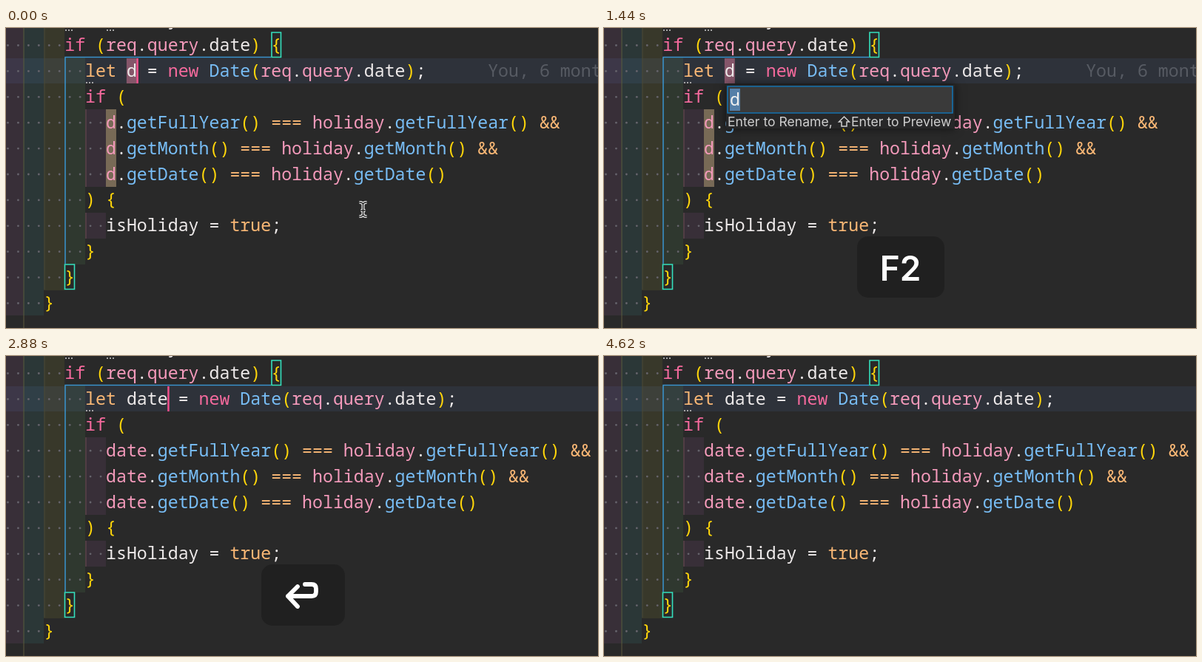
An HTML page with a canvas for the animation above (4.68 s loop, 800 by 406 pixels).

```html
<!DOCTYPE html>
<html lang="en">
<head>
<meta charset="utf-8">
<title>Rename symbol</title>
<style>
html, body { margin: 0; height: 100%; overflow: hidden; background: #292929; }
canvas { display: block; }
</style>
</head>
<body>
<canvas id="stage" width="800" height="406"></canvas>
<script>
const ctx = document.getElementById('stage').getContext('2d');
const LOOP = 4680, CELL = 13.95, ROW = 34.9;
const OPEN = 1230, RENAMED = 2700;            // ms
const TYPED = [1740, 1890, 2040, 2190];       // one time per letter
const MONO = '23.25px "Noto Sans Mono", monospace';
const PINK = '#f56a9d', ROSE = '#f49abb', PEACH = '#f9b775',
      GOLD = '#ffd60a', BLUE = '#78bdf5', WHITE = '#eeeaea';
const BANDS = ['255,127,255', '79,236,236', '255,255,64', '127,255,127', '255,127,255'];

const colX = c => -4.5 + c * CELL;
const rowMid = r => 23 + r * ROW;
const rowTop = r => rowMid(r) - ROW / 2;

function rect(x, y, w, h, color) {
  ctx.fillStyle = color;
  ctx.fillRect(x, y, w, h);
}

function text(str, x, y, color, font = MONO) {
  ctx.font = font;
  ctx.fillStyle = color;
  ctx.fillText(str, x, y);
}

function stroke(path, color, width) {
  ctx.strokeStyle = color;
  ctx.lineWidth = width;
  ctx.stroke(new Path2D(path));
}

// [row, indent in cells, code]
const lines = name => [
  [-1, 6, 'let holiday = new Date();'],
  [0, 6, 'if (req.query.date) {'],
  [1, 8, `let ${name} = new Date(req.query.date);`],
  [2, 8, 'if ('],
  [3, 10, `${name}.getFullYear() === holiday.getFullYear() &&`],
  [4, 10, `${name}.getMonth() === holiday.getMonth() &&`],
  [5, 10, `${name}.getDate() === holiday.getDate()`],
  [6, 8, ') {'],
  [7, 10, 'isHoliday = true;'],
  [8, 8, '}'],
  [9, 6, '}'],
  [10, 4, '}']
];

function tokenColor(token, next) {
  if (/^(if|new)$/.test(token)) return PINK;
  if (/^(let|true|===|&&)$/.test(token)) return PEACH;
  if (/[(){}]/.test(token)) return GOLD;
  if (/\w/.test(token) && next === '(') return BLUE;
  if (/\w/.test(token) && next === '.') return ROSE;
  return WHITE;
}

function drawIndent(row, indent) {
  const y = Math.round(rowTop(row));
  const height = Math.round(rowTop(row + 1)) - y;
  for (let i = 0; i < indent / 2; i++) {
    const x = Math.max(0, Math.round(colX(i * 2)));
    rect(x, y, Math.round(colX(i * 2 + 2)) - x, height, `rgba(${BANDS[i]},.07)`);
  }
  ctx.fillStyle = '#66646c';
  for (let c = 0; c < indent; c++) {
    ctx.beginPath();
    ctx.arc(colX(c + .5), rowMid(row) + .5, 1.4, 0, 7);
    ctx.fill();
  }
}

function drawCode(row, indent, code) {
  for (const m of code.matchAll(/\w+|===|&&|\S/g)) {
    const next = code[m.index + m[0].length];
    text(m[0], colX(indent + m.index), rowMid(row) + 8, tokenColor(m[0], next));
  }
}

function hintDots(x, y) {
  for (let i = 0; i < 3; i++) rect(x + i * 4, y, 2, 2, '#a5a5a5');
}

function drawEditor(t) {
  const renamed = t >= RENAMED;
  const code = lines(renamed ? 'date' : 'd');
  rect(0, 0, 800, 406, '#292929');
  rect(0, 41, 800, 34, '#2e323a');
  code.forEach(([row, indent]) => drawIndent(row, indent));

  rect(23.5, 0, 1, 406, '#5e5a3e');
  rect(51.5, 0, 1, 354, '#47493a');
  rect(107.5, 110, 1, 105, '#6a4d50');
  rect(107.5, 250, 1, 35, '#6a4d50');

  if (!renamed) {
    rect(colX(12), 41, CELL, 34, '#85566a');
    rect(colX(10), 110, CELL, 105, '#786a56');
    text('You, 6 months ago', colX(47), rowMid(1) + 8, '#575b63');
  }
  stroke('M358 39.5H80V319', '#3b94d0', 1.5);
  code.forEach(line => drawCode(...line));
  hintDots(80, 2);
  hintDots(136, 2);
  hintDots(108, 73);
  stroke('M359 6H371.5V39.5H359ZM79.5 320H92.5V353.5H79.5Z', '#35e0bd', 1.6);

  const blink = renamed ? t - RENAMED : t + 400;
  const focused = renamed || t < OPEN;
  if (focused && blink % 1000 < 500) rect(colX(renamed ? 16 : 13) - .5, 41, 2.5, 34, '#f0508c');
}

function drawPointer() {
  const beam = 'M477.5 236Q482.5 236 482.5 239Q482.5 236 487.5 236M482.5 239V252M477.5 255Q482.5 255 482.5 252Q482.5 255 487.5 255M479.5 247H485.5';
  stroke(beam, '#e8e8e8', 4);
  stroke(beam, '#222', 1.4);
}

function drawRenameBox(t) {
  ctx.save();
  ctx.shadowColor = 'rgba(0,0,0,.6)';
  ctx.shadowBlur = 12;
  rect(165, 77, 309, 59, '#272728');
  ctx.restore();
  rect(167, 79, 304, 36, '#3a3a3a');
  stroke('M167 79H471V115H167Z', '#1472ae', 1.6);

  const count = TYPED.filter(at => t >= at).length;
  if (!count) rect(170, 82, CELL, 30, '#557fa8');
  text('date'.slice(0, count || 1), 170, 105, '#f0f0f0');
  const sinceKey = t - TYPED[count - 1];
  if (count && sinceKey % 1000 < 500) rect(170 + count * CELL, 83, 1.6, 29, '#e0e0e0');

  const label = '17.6px Inter, sans-serif';
  text('Enter to Rename,', 167, 133, '#cfcfcf', label);
  stroke('M324.5 120L331.5 127H328V133H321V127H317.5Z', '#cfcfcf', 1.5);
  text('Enter to Preview', 334, 133, '#cfcfcf', label);
}

// Pressed key badge that holds, then fades out
function drawKey(age, x, width, drawGlyph) {
  if (age < 0 || age > 750) return;
  ctx.save();
  ctx.globalAlpha = Math.min(1, (750 - age) / 250);
  ctx.fillStyle = '#202020';
  ctx.beginPath();
  ctx.roundRect(x, 282, width, 83, 15);
  ctx.fill();
  drawGlyph();
  ctx.restore();
}

function drawF2() {
  ctx.textAlign = 'center';
  text('F2', 400.5, 342, '#fff', '600 46px Inter, sans-serif');
}

function drawReturn() {
  ctx.lineCap = ctx.lineJoin = 'round';
  stroke('M404 309H413Q419 309 419 315V319Q419 325 413 325H381M394 312L381 325L394 339', '#fff', 5.8);
}

function draw(t) {
  drawEditor(t);
  if (t < OPEN) drawPointer();
  else if (t < RENAMED) drawRenameBox(t);
  drawKey(t - OPEN, 342, 118, drawF2);
  drawKey(t - RENAMED, 345, 113, drawReturn);
}

function tick() {
  draw(performance.now() % LOOP);
  requestAnimationFrame(tick);
}
tick();
</script>
</body>
</html>
```
